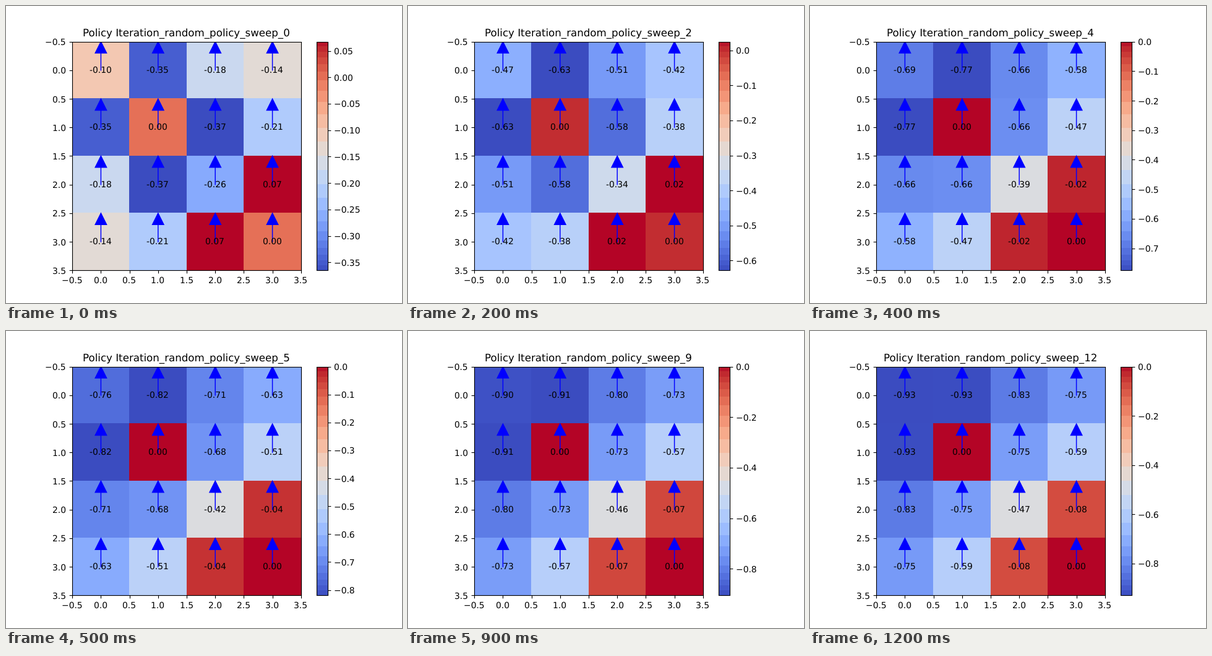
Write an HTML page with a canvas that moves like this. It is 640 px wide and 480 px high and loops after 1.3 s.

```html
<!DOCTYPE html>
<html>
<head>
<meta charset="utf-8">
<style>
html, body { margin: 0; width: 100%; height: 100%; overflow: hidden; background: #fff; }
canvas { display: block; }
</style>
</head>
<body>
<canvas id="stage" width="640" height="480"></canvas>
<script>
const ctx = document.getElementById('stage').getContext('2d');
const N = 4, SWEEPS = 13, STEP_MS = 100;
const LEFT = 107.2, TOP = 57.6, SIZE = 369.6, CELL = SIZE / N;
const BAR_X = 501.6, BAR_W = 18.48, BANDS = 24, TICK = 4.86, LABEL_GAP = 9.72;
const SHARE = { left: 0, center: 0.5, right: 1 };

// CIE Lab (D65) to an sRGB colour string.
function labToRgb(L, a, b) {
  const cube = f => f > 6 / 29 ? f ** 3 : (f - 4 / 29) * 108 / 841;
  const fy = (L + 16) / 116;
  const x = 0.9505 * cube(fy + a / 500), y = cube(fy), z = 1.089 * cube(fy - b / 200);
  const gamma = v => v > 0.0031308 ? 1.055 * v ** (1 / 2.4) - 0.055 : 12.92 * v;
  const rgb = [
    3.2406 * x - 1.5372 * y - 0.4986 * z,
    -0.9689 * x + 1.8758 * y + 0.0415 * z,
    0.0557 * x - 0.204 * y + 1.057 * z
  ].map(v => Math.round(255 * Math.max(0, Math.min(1, gamma(v)))));
  return `rgb(${rgb})`;
}

// Moreland's diverging map: blue and red fade to grey in polar Lab space.
function heat(t) {
  const fade = 1 - Math.abs(2 * t - 1);
  const length = 80 + 8 * fade;
  const sat = 1.08 * (1 - fade);
  const hue = t < 0.5 ? -1.1 - 0.561 * fade : 0.5 + 0.561 * fade;
  const chroma = length * Math.sin(sat);
  return labToRgb(length * Math.cos(sat), chroma * Math.cos(hue), chroma * Math.sin(hue));
}

// In-place evaluation of the random policy: pit at (1,1), goal at (3,3).
function evaluate() {
  const grid = Array.from({ length: N }, () => Array(N).fill(0));
  const exit = { '1,1': -1, '3,3': 1 };
  const clamp = i => Math.max(0, Math.min(N - 1, i));
  const history = [];
  for (let s = 0; s < SWEEPS; s++) {
    for (let r = 0; r < N; r++) {
      for (let c = 0; c < N; c++) {
        if ([r, c] in exit) continue;
        let sum = 0;
        for (const [dr, dc] of [[-1, 0], [1, 0], [0, -1], [0, 1]]) {
          const y = clamp(r + dr), x = clamp(c + dc);
          sum += 0.25 * ((exit[[y, x]] ?? -0.1) + 0.9 * grid[y][x]);
        }
        grid[r][c] = sum;
      }
    }
    history.push(grid.map(row => row.slice()));
  }
  return history;
}

const history = evaluate();
const snap = v => Math.floor(v + 0.5) + 0.5;
const signed = (v, digits) => (v < 0 ? '\u2212' : '') + Math.abs(v).toFixed(digits);

// Text starts on a whole pixel; its box is a little wider than its advance.
function text(str, x, y, align = 'center', size = 13.889) {
  ctx.font = `${size}px "DejaVu Sans", sans-serif`;
  ctx.textRendering = 'geometricPrecision';
  ctx.fillStyle = '#000';
  const width = ctx.measureText(str).width + 0.8;
  ctx.fillText(str, Math.round(x - width * SHARE[align]), Math.round(y));
}

function line(x1, y1, x2, y2) {
  ctx.beginPath();
  ctx.moveTo(x1, y1);
  ctx.lineTo(x2, y2);
  ctx.stroke();
}

function frameBox(x, y, w, h) {
  const x0 = snap(x), y0 = snap(y);
  ctx.strokeRect(x0, y0, snap(x + w) - x0, snap(y + h) - y0);
}

function arrow(x, y) {
  const tip = y - CELL / 2, base = tip + CELL * 0.2, half = CELL * 0.1;
  ctx.fillStyle = ctx.strokeStyle = '#00f';
  ctx.lineWidth = 1.39;
  ctx.beginPath();
  ctx.moveTo(x, tip);
  ctx.lineTo(x + half, base);
  ctx.lineTo(x - half, base);
  ctx.closePath();
  ctx.fill();
  ctx.stroke();
  ctx.lineWidth = 1.48;
  line(x, base, x, y + 0.7);
}

function drawGrid(grid, norm) {
  const edge = i => Math.round(i * CELL - 0.2);
  const middle = i => (i + 0.5) * CELL;
  const eachCell = paint => grid.forEach((row, r) => row.forEach((v, c) => paint(v, r, c)));
  ctx.save();
  ctx.beginPath();
  ctx.rect(107, 58, 370, 369);
  ctx.clip();
  eachCell((v, r, c) => {
    ctx.fillStyle = heat(norm(v));
    ctx.fillRect(107 + edge(c), 57 + edge(r), CELL + 1, CELL + 1);
  });
  eachCell((v, r, c) => arrow(LEFT + middle(c), TOP + middle(r)));
  ctx.restore();
  eachCell((v, r, c) => text(v.toFixed(2), LEFT + middle(c), TOP + middle(r) + 4));
}

function drawAxes() {
  const bottom = snap(TOP + SIZE), left = snap(LEFT);
  ctx.strokeStyle = '#000';
  ctx.lineWidth = 1.11;
  frameBox(LEFT, TOP, SIZE, SIZE);
  for (let i = 0; i <= 2 * N; i++) {
    const offset = i * CELL / 2, label = signed(i / 2 - 0.5, 1);
    const x = snap(LEFT + offset), y = snap(TOP + offset);
    line(x, bottom, x, bottom + TICK);
    line(left, y, left - TICK, y);
    text(label, LEFT + offset, 448);
    text(label, LEFT - LABEL_GAP, TOP + offset + 5.5, 'right');
  }
}

function drawBar(min, max) {
  const yAt = t => TOP + SIZE * (1 - t);
  // Bands are widest around the grey middle.
  const bandEdge = i => i / BANDS - 0.08 * Math.sin(2 * Math.PI * i / BANDS);
  for (let i = 0; i < BANDS; i++) {
    const low = bandEdge(i), high = bandEdge(i + 1), y = Math.round(yAt(high));
    ctx.fillStyle = heat((low + high) / 2);
    ctx.fillRect(502, y, 18, Math.round(yAt(low)) - y);
  }
  frameBox(BAR_X, TOP, BAR_W, SIZE);

  const step = [0.05, 0.1, 0.2].find(s => max - min <= 9 * s);
  const right = snap(BAR_X + BAR_W);
  for (let k = Math.ceil(min / step); k <= max / step; k++) {
    const v = k * step, y = yAt((v - min) / (max - min));
    line(right, snap(y), right + TICK, snap(y));
    text(signed(v, step < 0.1 ? 2 : 1), BAR_X + BAR_W + LABEL_GAP, y + 5.5, 'left');
  }
}

function draw(sweep) {
  const grid = history[sweep], all = grid.flat();
  const min = Math.min(...all), max = Math.max(...all);
  ctx.fillStyle = '#fff';
  ctx.fillRect(0, 0, 640, 480);
  drawGrid(grid, v => (v - min) / (max - min));
  drawAxes();
  drawBar(min, max);
  text(`Policy Iteration_random_policy_sweep_${sweep}`, LEFT + SIZE / 2, 49, 'center', 16.667);
}

const start = performance.now();
function tick() {
  draw(Math.floor((performance.now() - start) / STEP_MS) % SWEEPS);
  requestAnimationFrame(tick);
}
tick();
</script>
</body>
</html>
```
